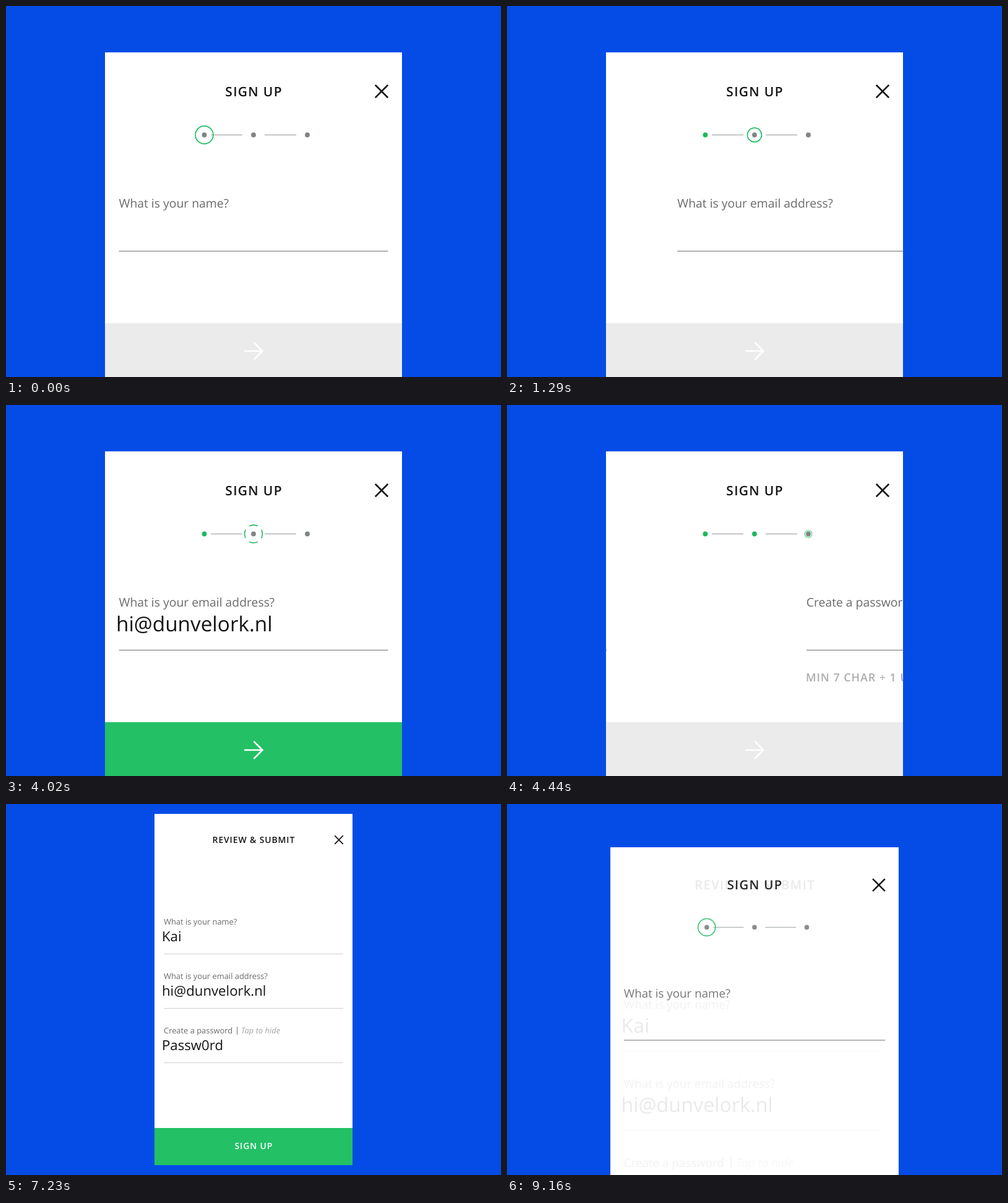
Write an HTML page that moves like this. It is 800 px wide and 600 px high and loops after 9.19 s.

```html
<!DOCTYPE html>
<html lang="en">
<head>
<meta charset="utf-8">
<title>Sign up</title>
<style>
  html, body { margin: 0; width: 100%; height: 100%; overflow: hidden; background: #054ce7; }
  #stage { display: block; width: 800px; height: 600px; }
  text { font-family: "Open Sans", "Noto Sans", sans-serif; text-rendering: geometricPrecision; }
  .title { font-size: 14px; font-weight: 600; letter-spacing: .85px; text-anchor: middle; fill: #151515; }
  .label { font-size: 12.9px; fill: #6b6b6b; }
  .hint { font-size: 13px; font-style: italic; fill: #a6a6a6; }
  .value { font-size: 22.2px; fill: #141414; }
  .rules { font-size: 12px; font-weight: 600; letter-spacing: .6px; fill: #adadad; }
  .light { fill: #fff; }
</style>
</head>
<body>
<svg id="stage" viewBox="0 0 800 600">
  <g id="card">
    <svg width="320" height="568">
      <rect width="320" height="568" fill="#fff"/>
      <g id="form">
        <text class="title" x="160.4" y="47">SIGN UP</text>
        <g id="steps">
          <path d="M114 89h34M172 89h34" stroke="#b0b5b3"/>
          <circle id="ring" cy="89" fill="none" stroke="#1fbe62" stroke-width="1.1" pathLength="4"/>
        </g>
        <g id="pages"></g>
      </g>
      <g id="review">
        <text class="title" x="160.4" y="47">REVIEW &amp; SUBMIT</text>
      </g>
      <path d="M291.2 35.2l13.6 13.6m0-13.6l-13.6 13.6" stroke="#151515" stroke-width="1.75"/>
      <g id="button">
        <rect id="fill" width="320" height="60"/>
        <path id="arrow" d="M150 30h19.3M160.3 20.6l9.3 9.4l-9.3 9.4" fill="none" stroke="#fff" stroke-width="1.8"/>
        <text id="submit" class="title light" x="160.4" y="34">SIGN UP</text>
      </g>
    </svg>
  </g>
</svg>
<script>
const LOOP = 9190;
const NAME = 'Kai', EMAIL = 'hi@dunvelork.nl', PASS = 'Passw0rd';
const ASK = ['What is your name?', 'What is your email address?', 'Create a password'];
const DOT_X = [107, 160, 218];
const DONE = [1380, 4590];      // moments when a page change has settled
const REVEAL = 6480, PAGE_GAP = 505;
const GREEN = '#1cb85c';

const $ = id => document.getElementById(id);
const ramp = (t, a, b) => Math.min(1, Math.max(0, (t - a) / (b - a)));
const ease = (t, a, b) => (1 - Math.cos(Math.PI * ramp(t, a, b))) / 2;
const typed = (t, start, gap) => Math.max(0, Math.floor((t - start) / gap) + 1);
const mix = (a, b, k) => `rgb(${a.map((v, i) => Math.round(v + (b[i] - v) * k))})`;

function add(parent, tag, attrs, text = '') {
  const el = document.createElementNS('http://www.w3.org/2000/svg', tag);
  for (const key in attrs) el.setAttribute(key, attrs[key]);
  el.textContent = text;
  return parent.appendChild(el);
}

// One question with its answer, placed relative to the underline at y.
function field(parent, i, y, stroke, value, hint) {
  const g = add(parent, 'g', {});
  add(g, 'text', { class: 'label', x: 15, y: y - 47.3 }, ASK[i]);
  add(g, 'path', { d: `M15 ${y}h290`, stroke });
  const answer = add(g, 'text', { class: 'value', x: 12, y: y - 20.3 }, value);
  if (!hint) return { g, answer };
  add(g, 'rect', { x: 133.2, y: y - 58.3, width: 1, height: 12.8, fill: '#6b6b6b' });
  const note = add(g, 'text', { class: 'hint', x: 140, y: y - 47.3 }, hint);
  return { g, answer, note };
}

const pages = ASK.map((_, i) => field($('pages'), i, 214.4, '#959595', '', i === 2 && 'Tap to reveal'));
const last = pages[2];
[NAME, EMAIL, PASS].forEach((v, i) =>
  field($('review'), i, 226.5 + 88 * i, '#d0d0d0', v, i === 2 && 'Tap to hide'));

const steps = DOT_X.map(cx => add($('steps'), 'circle', { cx, cy: 89, r: 2.6 }));
const bullets = [...PASS].map((_, i) =>
  add(last.g, 'ellipse', { cx: 17 + 12.43 * i, cy: 187.7, rx: 2.6, ry: 2.9, fill: '#141414' }));

const rules = add(last.g, 'text', { class: 'rules', x: 14.4, y: 248 });
const ruleSpans = ['MIN 7 CHAR', '1 UPPERCASE', '1 NUMBER'].map((s, i) => {
  if (i) add(rules, 'tspan', { 'font-weight': 400 }, ' + ');
  return add(rules, 'tspan', {}, s);
});
const RULE_MET = [6030, 5005, 5875];

function drawSteps(t) {
  const i = DONE.filter(e => t >= e - 200).length;
  const grow = i ? ease(t, DONE[i - 1] - 195, DONE[i - 1] - 30) : 1;
  const shrink = i < 2 ? ease(t, DONE[i] - 390, DONE[i] - 215) : 0;
  const size = grow * (1 - shrink);
  const ring = $('ring');
  ring.setAttribute('cx', DOT_X[i]);
  ring.setAttribute('r', 2.6 + 7 * size);
  ring.style.opacity = size ? Math.min(1, .4 + size) : 0;

  // While the email is checked the ring splits into four arcs and turns.
  const dash = i === 1 ? 1 - .38 * ease(t, 2940, 3090) : 1;
  ring.setAttribute('stroke-dasharray', dash < 1 ? `${dash} ${1 - dash}` : 'none');
  ring.setAttribute('stroke-dashoffset', dash / 2);
  const turn = i === 1 ? Math.max(0, t - 3510) * 180 / 510 : 0;
  ring.setAttribute('transform', `rotate(${turn} ${DOT_X[i]} 89)`);

  steps.forEach((s, k) => s.setAttribute('fill', t > DONE[k] - 260 ? GREEN : '#7e8583'));
}

function drawPages(t) {
  const shift = DONE.reduce((sum, e) => sum + ease(t, e - 313, e - 23), 0);
  pages.forEach((p, i) => p.g.setAttribute('transform', `translate(${PAGE_GAP * (i - shift)} 0)`));
  pages[0].answer.textContent = NAME.slice(0, typed(t, 480, 96));
  pages[1].answer.textContent = EMAIL.slice(0, typed(t, 1740, 96));

  const shown = t >= REVEAL, count = typed(t, 4980, 175);
  last.answer.textContent = shown ? PASS : '';
  last.note.textContent = shown ? 'Tap to hide' : 'Tap to reveal';
  bullets.forEach((b, i) => b.style.opacity = !shown && i < count ? 1 : 0);
  ruleSpans.forEach((s, i) => s.setAttribute('fill', t >= RULE_MET[i] ? GREEN : '#adadad'));
}

function draw(t) {
  const back = t > 8000;
  const zoom = back ? ramp(t, 8860, 9190) : 1 - ease(t, 6660, 7230);
  const scale = 1 + zoom / 2;
  $('card').setAttribute('transform',
    `translate(${400 - 160 * scale} ${16 + 59 * zoom}) scale(${scale})`);
  $('form').style.opacity = zoom;
  $('review').style.opacity = 1 - zoom;

  const formTime = back ? 0 : t;
  drawSteps(formTime);
  drawPages(formTime);

  const ready = back ? 1 :
    ease(t, 630, 780) - ease(t, 990, 1140) +
    ease(t, 2940, 3090) - ease(t, 4200, 4350) + ease(t, 6060, 6210);
  const drop = back ? 1 : 1 - zoom;
  $('fill').setAttribute('fill', mix([235, 235, 235], [35, 192, 101], ready));
  $('button').setAttribute('transform', `translate(0 ${292 + 216 * drop})`);
  $('arrow').style.opacity = 1 - drop;
  $('submit').style.opacity = drop;
}

const start = performance.now();
function tick() {
  draw((performance.now() - start) % LOOP);
  requestAnimationFrame(tick);
}
tick();
</script>
</body>
</html>
```
